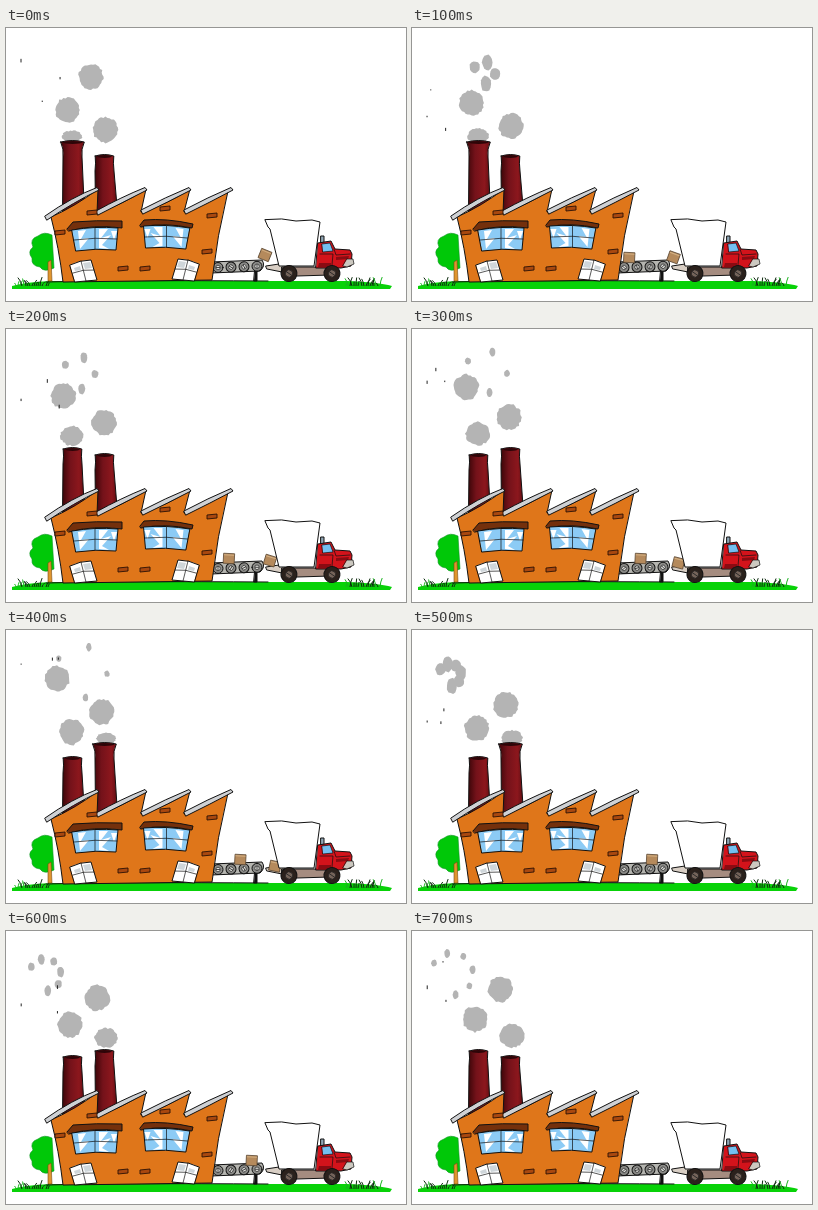
These frames come from a looping animation (400 by 273 pixels, 0.8 s). An HTML page:

```html
<!DOCTYPE html>
<html lang="en">
<head>
<meta charset="utf-8">
<title>Factory</title>
<style>
  html, body { margin: 0; width: 100%; height: 100%; overflow: hidden; background: #fff; }
  svg { display: block; width: 100vw; height: 100vh; }
  .ink { stroke: #111; stroke-width: 1; stroke-linejoin: round; stroke-linecap: round; }
  .line { fill: none; }
  .thin { stroke-width: .7; }
  .brick { fill: #a9480f; stroke: #2c1206; stroke-width: .9; }
  .lintel { fill: #74300c; }
  .box { fill: #b58a5c; stroke: #5d4934; stroke-width: .8; }
</style>
</head>
<body>
<svg viewBox="0 0 400 273" preserveAspectRatio="none">
  <defs>
    <linearGradient id="brickwork">
      <stop offset="0" stop-color="#3d0609"/>
      <stop offset=".35" stop-color="#74121a"/>
      <stop offset=".75" stop-color="#8c171d"/>
      <stop offset="1" stop-color="#5e0d12"/>
    </linearGradient>
    <g id="glass">
      <path class="ink" fill="#8ccbf5" d="M0 2Q23-2 46 0L44 22Q24 20 4 23Z"/>
      <path fill="#fff" d="M6 3l8-1-5 9 8-1-9 11zM27 1l9 0-7 9 10-3-9 10 7 4-10-1zM39 3l6 0-3 9z"/>
      <path class="ink line thin" d="M23 0v21M2 12Q23 9 45 11"/>
    </g>
    <g id="door">
      <path class="ink" fill="#fff" d="M0 5Q10 0 21 0L27 20 5 22Z"/>
      <path class="ink line thin" d="M11 1L16 21M3 13Q13 9 24 10"/>
      <path fill="#cfd6da" d="M13 3l7-1 2 6-7 1zM4 8l6-2 1 4-6 1z"/>
    </g>
  </defs>

  <g id="smoke" fill="#b4b4b4"></g>
  <path id="specks" fill="none" stroke="#222"/>
  <g id="stacks"></g>

  <!-- ground and tree -->
  <path fill="#08d208" d="M6 258Q20 254 45 253H340Q372 254 386 258L384 261H6Z"/>
  <path class="ink line" d="M40 254Q120 252 262 253"/>
  <g id="grass" class="line"></g>
  <path fill="#00c808" stroke="#0b9420" stroke-width=".6" d="M46 207Q38 203 32 208Q23 211 27 219Q21 224 26 230Q25 238 34 239Q38 245 48 240Z"/>
  <path fill="#e0952e" stroke="#7b4a12" stroke-width=".6" d="M42 234l3-2 1 21h-4z"/>

  <!-- conveyor, boxes, truck -->
  <path class="ink" fill="#b5b5b0" d="M205 234L256 232Q260 238 254 243L205 245Z"/>
  <path class="ink" fill="#111" d="M249 242h2v11h-3z"/>
  <g id="rollers"></g>
  <path class="ink" fill="#d8cec4" d="M260 238L273 236 291 240V247L276 244 261 241Z"/>
  <g id="cargo"></g>
  <path class="ink" fill="#a58c80" d="M276 239H322L324 247 291 248 276 243Z"/>
  <path class="ink" fill="#fff" d="M259 192L262 199 264 201 273 238H308L314 194 306 192 290 193 276 191Z"/>
  <path class="ink" fill="#8fa6b5" d="M315 208h3v7h-3z"/>
  <path class="ink" fill="#d3131b" d="M312 215L325 213 329 221 344 222 346 226 345 238 335 240 310 240Z"/>
  <path class="ink thin" fill="#73bff0" d="M316 216l8-1 3 8-10 1z"/>
  <path class="ink line thin" d="M328 221l2 6 14-1M314 226l13 0-1 11"/>
  <path fill="#8a0b12" d="M330 229l13-1-1 3-12 1zM313 235h12v4h-13z"/>
  <path class="ink thin" fill="#ccc8c0" d="M341 231h6l1 5-7 3-4-1z"/>
  <g id="wheels"></g>

  <!-- factory -->
  <path class="ink" fill="#df761a" d="M45 189Q70 178 92 161L91 185Q116 177 140 161L135 184Q162 176 184 161L178 184Q202 176 222 163Q211 208 206 252L57 254Q53 220 45 189Z"/>
  <g id="roof" class="ink" fill="#cfd1d4"></g>
  <g id="bricks"></g>
  <path class="ink lintel" d="M61 201L67 194Q90 192 116 193V200Q88 196 63 203Z"/>
  <path class="ink lintel" d="M134 197L138 192Q160 190 187 196L186 200Q158 194 135 199Z"/>
  <use href="#glass" x="66" y="200"/>
  <use href="#glass" transform="translate(183.500 198) scale(-1 1)"/>
  <use href="#door" x="64" y="232"/>
  <use href="#door" transform="translate(193 231) scale(-1 1)"/>
</svg>

<script>
const STEP = 100, POSES = 8, FULL = 12;
const el = id => document.getElementById(id);

function random(seed) {
  return () => (seed = (seed * 16807 + 11) % 2147483647) / 2147483647;
}

function blob(x, y, rx, ry) {
  const rnd = random(Math.round(x * 911 + y * 37)), n = rx > 7 ? 36 : 14;
  const pts = Array.from({ length: n }, (_, i) => {
    const a = i / n * Math.PI * 2, k = .9 + rnd() * .16;
    return (x + Math.cos(a) * rx * k).toFixed(1) + "," + (y + Math.sin(a) * ry * k).toFixed(1);
  });
  return `<polygon points="${pts.join(" ")}"/>`;
}

// a puff swells, speeds up and drifts left
function puff(x, age) {
  return blob(x - 15 * (age / FULL) ** 3, 108.500 - .415 * age * age,
    Math.min(12.6, 10 + age * .8), Math.min(13, 6 + age * 2));
}

// then it breaks into pieces that fly apart along an arc
function pieces(x, age, count) {
  const k = age - FULL, size = 2.2 + 4 / k, reach = 6 + 5 * k;
  return Array.from({ length: count }, (_, i) => {
    const a = -2.6 + 4 * i / (count - 1);
    return blob(x - 29 + k + Math.cos(a) * reach, 46 - k + Math.sin(a) * reach, size * .85, size * (1 + i % 2 * .3));
  }).join("");
}

function smoke(x, pose, count, life) {
  let out = "";
  for (let age = pose; age < life; age += POSES)
    out += age <= FULL ? puff(x, age) : pieces(x, age, count);
  return out;
}

function specks(pose) {
  const rnd = random(pose * 97 + 31);
  return Array.from({ length: 3 }, () => `M${15 + rnd() * 40} ${25 + rnd() * 75}v${1 + rnd() * 3}`).join("");
}

// stretches just before letting a puff go
function stack(x, foot, pose) {
  const gap = Math.abs(pose - .5), top = Math.min(127, 110 + 6 * Math.min(gap, POSES - gap));
  const flare = top < 116 ? 2.5 : 0, w = 9.3 + flare;
  return `<path class="ink" fill="url(#brickwork)" d="M${x - w} ${top + 1}Q${x} ${top - 2} ${x + w} ${top + 1}
    Q${x + 8.5} ${top + 8} ${x + 9.5} ${top + 16}L${foot + 11} 184H${foot - 11}
    L${x - 9.5} ${top + 16}Q${x - 8.5} ${top + 8} ${x - w} ${top + 1}Z"/>
    <ellipse cx="${x}" cy="${top + 1.5}" rx="${w - 2}" ry="1.5" fill="#2d0508"/>`;
}

function box(x, y, turn) {
  return `<g transform="translate(${x} ${y}) rotate(${turn})"><path class="box" d="M-5.5-5h11v10h-11z"/>
    <path class="line" stroke="#d4b184" d="M-5-3.5h10"/></g>`;
}

function cargo(pose) {
  const riding = pose > 0 && pose < 7 ? box(211.500 + 5.7 * pose, 229.500, 3) : "";
  const falling = pose < 5 ? box(259 + 2.5 * pose, 227 + 2.3 * pose, 22 - 2.5 * pose) : "";
  return riding + falling;
}

function wheel(x, y, r, turn, tyre, hub) {
  return `<g transform="translate(${x} ${y}) rotate(${turn})"><circle class="ink" r="${r}" fill="${tyre}"/>
    <circle r="${r * .45}" fill="${hub}" stroke="#222" stroke-width=".7"/>
    <path class="line" stroke="#222" stroke-width=".8" d="M${-r * .4} 0H${r * .4}"/></g>`;
}

function tuft(x0, x1, seed) {
  const rnd = random(seed);
  let out = "";
  for (let x = x0; x < x1; x += 2) {
    const h = 3 + rnd() * 6, lean = (rnd() - .5) * 9;
    out += `<path d="M${x} 258q${lean * .2} ${-h * .6} ${lean} ${-h}" stroke="${rnd() > .3 ? "#0c2a0d" : "#18b41d"}"/>`;
  }
  return out;
}

el("grass").innerHTML = tuft(10, 44, 71) + tuft(340, 376, 423);
el("roof").innerHTML = [[39, 190, 93], [90, 185, 141], [135, 184, 185], [178, 184, 227]].map(([x, y, end]) => {
  const mid = (x + end) / 2;
  return `<path d="M${x} ${y - 2}Q${mid} 169 ${end - 2} 159.500L${end} 162Q${mid + 2} 174 ${x + 2} ${y + 2}Z"/>`;
}).join("");
el("bricks").innerHTML = [[49, 203], [112, 239], [134, 239], [201, 186], [196, 222], [81, 183], [154, 179]].map(([x, y]) =>
  `<path class="brick" d="M${x} ${y}l10-1 0 4-10 1z"/>`).join("");
el("wheels").innerHTML = [283, 326].map(x => wheel(x, 245.500, 8, 35, "#2b211c", "#75645a")).join("");

let shown = -1;
function draw() {
  const pose = Math.floor(performance.now() / STEP) % POSES;
  if (pose !== shown) {
    shown = pose;
    const half = (pose + POSES / 2) % POSES;
    el("smoke").innerHTML = smoke(66, pose, 6, 16) + smoke(100, half, 4, 17);
    el("specks").setAttribute("d", specks(pose));
    el("stacks").innerHTML = stack(66.500, 67.500, pose) + stack(98.500, 100.500, half);
    el("cargo").innerHTML = cargo(pose);
    el("rollers").innerHTML = [0, 1, 2, 3].map(i =>
      wheel(212 + 13 * i, 239.500 - i * .4, 5, pose * 45 + i * 30, "#8b8b88", "#e0e0dc")).join("");
  }
  requestAnimationFrame(draw);
}
draw();
</script>
</body>
</html>
```
